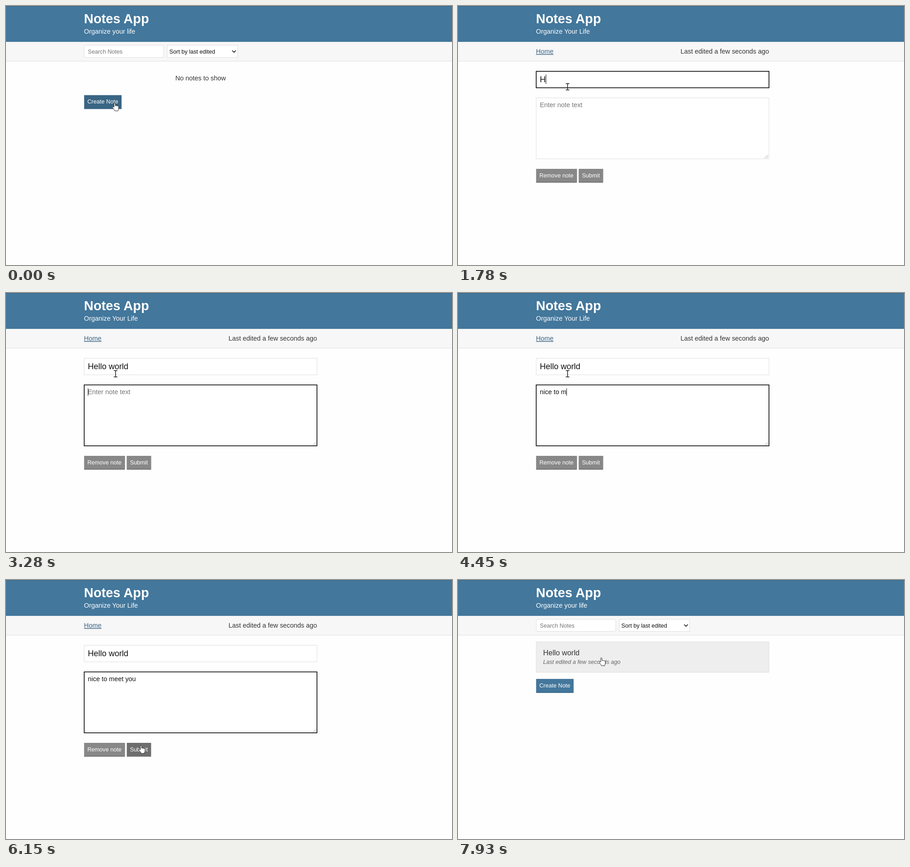
Recreate the animation shown at these times as an HTML page. Size 981x571 px, loop 8000 ms.

```html
<!DOCTYPE html>
<html lang="en">
<head>
<meta charset="utf-8">
<title>Notes App</title>
<style>
  html, body { margin: 0; width: 100%; height: 100%; overflow: hidden; background: #fefefe; }
  svg { display: block; width: 981px; height: 571px; }
  text { font: 14.4px Arial, "Liberation Sans", sans-serif; fill: #333; white-space: pre; }
  .small { font-size: 12.6px; }
  .white { fill: #fff; }
  .hint { fill: #757575; }
  .dark { fill: #111; }
  .box { fill: #fff; stroke: #dedede; }
  .focus { stroke: #101010; stroke-width: 1.7; }
  #heading { font-size: 28.8px; font-weight: bold; }
  #title { font-size: 18px; }
  #hand, #arrow { fill: #fff; stroke: #111; stroke-width: .9; stroke-linejoin: round; }
  #beam { fill: none; stroke: #1c1c1c; stroke-width: 1.5; }
</style>
</head>
<body>
<svg viewBox="0 0 981 571">
  <rect width="981" height="571" fill="#fefefe"/>
  <rect width="981" height="79.3" fill="#43779c"/>
  <rect width="981" height="1" fill="#396584"/>
  <rect y="79.3" width="981" height="42.2" fill="#f7f7f7"/>
  <rect y="121.3" width="981" height="1" fill="#dedede"/>
  <text id="heading" class="white" x="171.6" y="38">Notes App</text>
  <text id="subtitle" class="white" x="171.6" y="61.3"></text>

  <g id="home">
    <rect class="box" x="172" y="86.5" width="175" height="27" rx="4"/>
    <text class="small hint" x="180" y="104.7">Search Notes</text>
    <rect class="box" x="354.5" y="86.5" width="155" height="27"/>
    <text class="small dark" x="359.3" y="104.7">Sort by last edited</text>
    <path d="M497.5 98l4 4 4-4" fill="none" stroke="#111" stroke-width="1.6"/>
    <text id="empty" x="428" y="164" text-anchor="middle">No notes to show</text>
    <g id="card">
      <rect id="cardBox" x="172" y="136.5" width="512" height="67" stroke="#dedede"/>
      <text x="187.2" y="165.8" style="font-size:16.2px">Hello world</text>
      <text class="small" x="187.2" y="185.2" style="font-style:italic;fill:#666">Last edited a few seconds ago</text>
    </g>
    <g id="create">
      <rect x="171.9" y="196.5" width="82.3" height="30.7" fill="#396584"/>
      <rect id="createFace" x="171.9" y="196.5" width="82.3" height="28.9" fill="#43779c"/>
      <text class="small white" x="179" y="215.2">Create Note</text>
    </g>
  </g>

  <g id="edit">
    <text x="171.6" y="105" style="fill:#396584;text-decoration:underline">Home</text>
    <text x="684" y="105" text-anchor="end">Last edited a few seconds ago</text>
    <rect id="titleBox" class="box" x="172" y="144" width="512" height="36.3"/>
    <text id="title" x="180" y="167.6"></text>
    <rect id="bodyBox" class="box" x="172" y="202.6" width="512" height="134.3"/>
    <text id="body" x="180" y="223"></text>
    <path d="M675 335.5l7-7M679.5 335.5l2.5-2.5" stroke="#888" stroke-width=".9"/>
    <rect id="caret" width="1" fill="#111"/>
    <rect x="171.9" y="359" width="89.6" height="30.5" fill="#6e6e6e"/>
    <rect x="171.9" y="359" width="89.6" height="28.7" fill="#888"/>
    <text class="small white" x="179" y="377.6">Remove note</text>
    <rect x="265.7" y="359" width="53.5" height="30.5" fill="#6e6e6e"/>
    <rect id="submitFace" x="265.7" y="359" width="53.5" height="28.7" fill="#888"/>
    <text class="small white" x="272.7" y="377.6">Submit</text>
  </g>

  <g id="cursor">
    <path id="hand" d="M-1.4 9.8V1.6a1.4 1.4 0 0 1 2.8 0V6.6c.3-1 2.4-1 2.7.2 .4-.8 2.3-.7 2.5.5 .5-.7 2.2-.4 2.2 1V12c0 2.5-1.2 3.2-1.4 5.7H.2C0 15.5-3.5 12.5-4.8 10.2c-.7-1.3.8-2.4 1.9-1.4z"/>
    <path id="arrow" d="M.5.5V14l3.1-2.9 2.2 5.3 2.1-.9-2.2-5.1h4.3z"/>
    <path id="beam" d="M-4-7H4M-4 7H4M0-7V7"/>
  </g>
</svg>
<script>
const LOOP = 8000, OPEN = 290, SAVE = 6390, FOCUS_TITLE = 1150, FOCUS_BODY = 3280;
const titleKeys = [1780, 2010, 2150, 2290, 2290, 2420, 2420, 2550, 2550, 2720, 2850];
const bodyKeys = [3510, 3630, 3740, 3810, 3940, 4070, 4200, 4330, 4450, 4520, 4630, 4740, 4840, 4920, 5030, 5150];

// Pointer moves: start, end, jumps, from, to
const moves = [
  [770, 1055, 4, [239, 213.5], [241, 178]],
  [5460, 5990, 7, [241, 178], [297, 364.5]],
  [6760, 6760, 1, [297, 364.5], [295.5, 364]],
  [7160, 7160, 1, [295.5, 364], [300, 337]],
  [7230, 7860, 9, [300, 337], [315.3, 171.3]]
];

const $ = id => document.getElementById(id);
const between = (t, a, b) => t >= a && t < b;
const show = (id, on) => $(id).style.display = on ? '' : 'none';
const ramp = (t, start, length) => Math.min(1, Math.max(0, (t - start) / length));
const typed = (text, keys, t) => text.slice(0, keys.filter(k => k <= t).length);

function pointer(t) {
  let at = moves[0][3];
  for (const [start, end, n, from, to] of moves) {
    if (t < start) break;
    const step = n > 1 ? Math.floor(ramp(t, start, end - start) * (n - 1) + 1e-6) + 1 : n;
    const p = 1 - (1 - step / n) ** 2;
    at = from.map((v, i) => v + (to[i] - v) * p);
  }
  return at;
}

function shape(t, y) {
  if (t < 770 || between(t, SAVE, 6760)) return 'hand';
  if (t >= SAVE) return y < 203 ? 'hand' : 'arrow';
  if (y > 359) return 'hand';
  return between(y, 144, 181) || between(y, 203, 337) ? 'beam' : 'arrow';
}

function field(id, text, hint) {
  $(id).textContent = text || hint;
  $(id).setAttribute('class', text ? 'dark' : 'hint');
}

function drawEditor(t) {
  const title = typed('Hello world', titleKeys, t);
  const body = typed('nice to meet you', bodyKeys, t);
  field('title', title, 'Note title');
  field('body', body, 'Enter note text');
  const inBody = t >= FOCUS_BODY, inTitle = t >= FOCUS_TITLE && !inBody;
  $('titleBox').classList.toggle('focus', inTitle);
  $('bodyBox').classList.toggle('focus', inBody);

  const blink = between(t, 1530, 1780) || between(t, 5650, 6230);
  const [id, text, y, height] = inBody ? ['body', body, 210, 16.5] : ['title', title, 151, 21];
  show('caret', (inTitle || inBody) && !blink);
  $('caret').setAttribute('x', 180 + (text ? $(id).getComputedTextLength() : 0));
  $('caret').setAttribute('y', y);
  $('caret').setAttribute('height', height);
  $('submitFace').style.opacity = 1 - ramp(t, 5850, 280);
}

function drawHome(t) {
  const saved = t >= SAVE;
  show('empty', !saved);
  show('card', saved);
  show('createFace', saved);
  $('create').setAttribute('transform', `translate(0 ${saved ? 21.7 : 0})`);
  const grey = 247 - 9 * ramp(t, 7590, 300);
  $('cardBox').setAttribute('fill', `rgb(${grey},${grey},${grey})`);
}

function draw(t) {
  const editing = between(t, OPEN, SAVE);
  show('edit', editing);
  show('home', !editing);
  $('subtitle').textContent = editing ? 'Organize Your Life' : 'Organize your life';
  editing ? drawEditor(t) : drawHome(t);

  const [x, y] = pointer(t), kind = shape(t, y);
  for (const id of ['hand', 'arrow', 'beam']) show(id, id === kind);
  $('cursor').setAttribute('transform', `translate(${x} ${y})`);
}

function frame() {
  draw(performance.now() % LOOP);
  requestAnimationFrame(frame);
}
frame();
</script>
</body>
</html>
```
